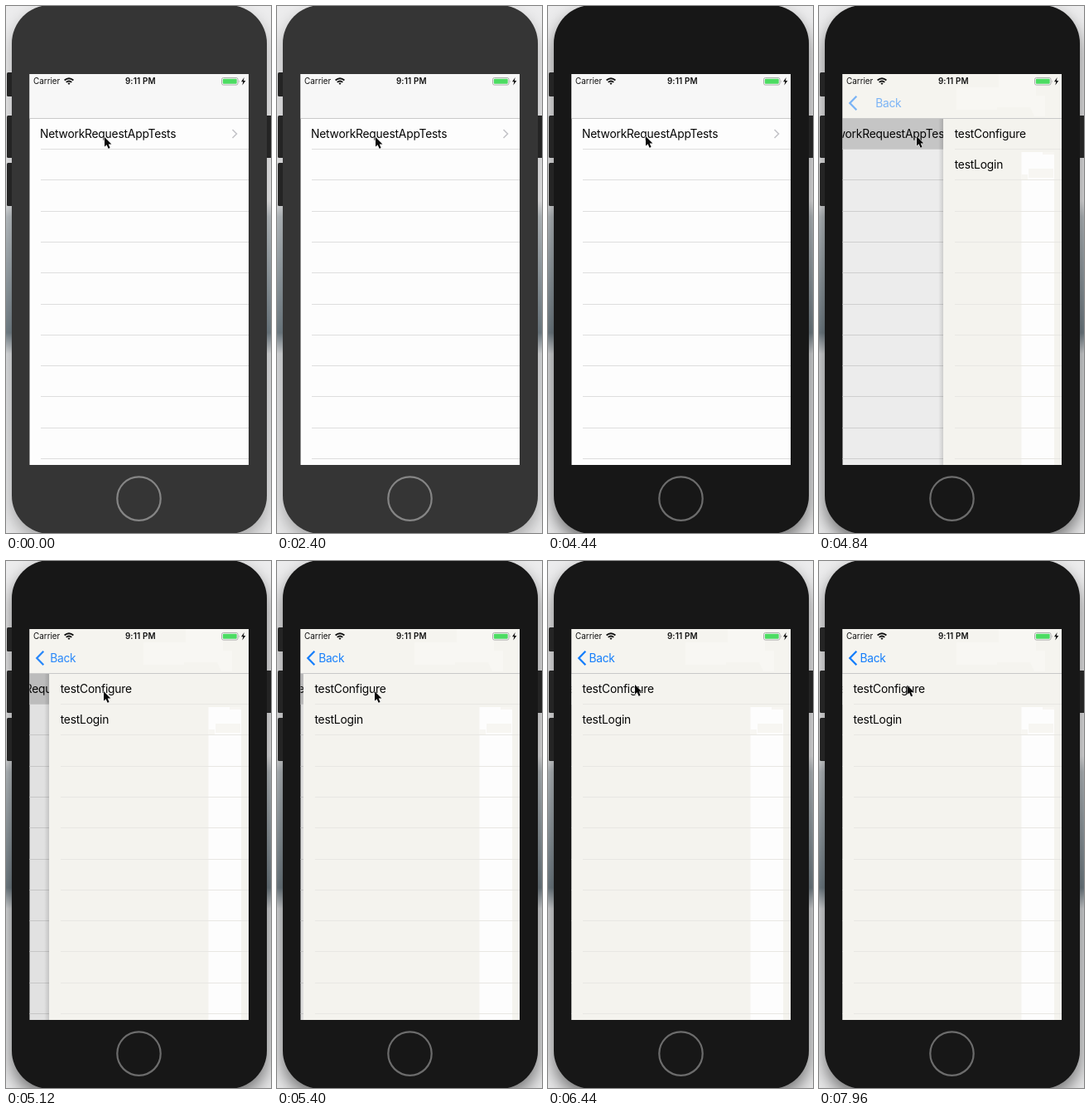
Write an HTML page that moves like this. It is 320 px wide and 635 px high and loops after 8 s.

```html
<!DOCTYPE html>
<html lang="en">
<head>
<meta charset="utf-8">
<title>Test list</title>
<style>
  html, body { margin: 0; width: 100%; height: 100%; overflow: hidden; background: #d4d4d5; }
  svg { display: block; width: 320px; height: 635px; }
  text { font-family: Inter, Roboto, "Liberation Sans", sans-serif; white-space: pre; }
  .row { font-size: 13.8px; letter-spacing: -0.2px; fill: #050505; }
  .status { font-size: 9.9px; fill: #111; }
  .line { stroke: #dedede; stroke-width: 1; }
  #detail .line { stroke: #e8e7e3; }
  #backText { font-size: 13.8px; letter-spacing: -0.3px; }
</style>
</head>
<body>
<svg viewBox="0 0 320 635">
  <defs>
    <linearGradient id="desk" x1="0" y1="0" x2="0" y2="1">
      <stop offset="0" stop-color="#ececed"/>
      <stop offset=".37" stop-color="#ececed"/>
      <stop offset=".4" stop-color="#bcc2c6"/>
      <stop offset=".52" stop-color="#96a0a6"/>
      <stop offset=".62" stop-color="#75828a"/>
      <stop offset=".66" stop-color="#dcdee0"/>
      <stop offset="1" stop-color="#e8e8e9"/>
    </linearGradient>
    <linearGradient id="shade">
      <stop offset="0" stop-color="#000" stop-opacity="0"/>
      <stop offset="1" stop-color="#000" stop-opacity=".13"/>
    </linearGradient>
    <filter id="blur" x="-20%" y="-20%" width="140%" height="140%">
      <feGaussianBlur stdDeviation="10"/>
    </filter>
    <clipPath id="screen"><rect x="28.5" y="82" width="264.5" height="471"/></clipPath>
    <clipPath id="page"><rect id="pageClip" x="28" y="136" width="265" height="417"/></clipPath>
  </defs>

  <rect width="320" height="635" fill="url(#desk)"/>
  <rect id="shadow" x="7" y="9" width="308" height="637" rx="46" filter="url(#blur)"/>
  <g fill="#242424">
    <rect x="1" y="80" width="8" height="29" rx="1.5"/>
    <rect x="1" y="132" width="8" height="51" rx="1.5"/>
    <rect x="1" y="189" width="8" height="52" rx="1.5"/>
    <rect x="313" y="132" width="9" height="51" rx="1.5"/>
  </g>
  <rect id="body" x="7" y="-1" width="308" height="637" rx="46"/>
  <circle id="home" cx="160.5" cy="593.6" r="26.2" fill="none" stroke-width="2.2"/>

  <g clip-path="url(#screen)">
    <rect x="28" y="82" width="265" height="471" fill="#fdfdfd"/>
    <g id="list">
      <rect id="press" x="28" y="136" width="265" height="36.5" fill="#d3d3d3"/>
      <g class="lines"></g>
      <text class="row" x="41" y="158.5">NetworkRequestAppTests</text>
      <path d="M273.5 149l5 5-5 5" fill="none" stroke="#c4c4c8" stroke-width="1.6"/>
    </g>
    <rect id="dim" x="28" y="136" width="265" height="417"/>
    <rect id="edge" y="136" width="6" height="417" fill="url(#shade)"/>

    <g clip-path="url(#page)">
      <rect x="28" y="136" width="265" height="417" fill="#f4f3ee"/>
      <rect x="244.5" y="176" width="39.5" height="377" fill="#fdfdfd"/>
      <path d="M244 203h8v6h-8zM270 176h14v3h-14zM253 196h30v11h-30z" fill="#f7f6f2"/>
      <g id="detail">
        <g class="lines"></g>
        <text class="row" x="41.6" y="158.5">testConfigure</text>
        <text class="row" x="41.6" y="195.7">testLogin</text>
      </g>
    </g>

    <rect id="nav" x="28" y="82" width="265" height="53"/>
    <path id="glow" d="M166 98h51v-16h45v26h11v25h-13l-5-11h-40v3h-49z" fill="#f8f7f3"/>
    <path d="M28 135.5h265" stroke="#c9c9c9"/>
    <g id="back" fill="#157efb">
      <path d="M45.3 108.8l-8 8.2 8 8.2" fill="none" stroke="#157efb" stroke-width="2.3"/>
      <text id="backText" x="49.6" y="122">Back</text>
    </g>

    <text class="status" x="33" y="94.4">Carrier</text>
    <g fill="none" stroke="#111" stroke-width="1.8">
      <path d="M70.6 89.5q5.4-4.6 10.8 0M72.7 91.9q3.3-2.8 6.6 0"/>
      <path d="M74.4 93.1q1.6-1.3 3.2 0l-1.6 1.8z" fill="#111" stroke="none"/>
    </g>
    <text class="status" x="162.3" y="94.4" text-anchor="middle" font-weight="600" letter-spacing=".15">9:11 PM</text>
    <rect x="260.5" y="86.5" width="19.5" height="8.6" rx="2" fill="#fafafa" stroke="#a5a5a5" stroke-width=".9"/>
    <rect x="261.8" y="87.8" width="16.9" height="6" rx="1" fill="#4cdc62"/>
    <path d="M281.3 89.2q1.3 1.6 0 3.2z" fill="#a5a5a5"/>
    <path d="M287.6 86l-3.6 5.2h2.3l-1 4.2 4-5.5h-2.5z" fill="#111"/>
  </g>

  <path id="cursor" d="M0 0v11.6l2.6-2.4 2 4.6 2-.8-1.9-4.5h3.7z" fill="#080808" stroke="#fff" stroke-width="1" paint-order="stroke"/>
</svg>
<script>
  const LOOP = 8000, DARK = 4440, PRESS = 4560, PUSH = 4611;
  const LEFT = 28, WIDTH = 265;
  const $ = id => document.getElementById(id);
  const set = (id, attrs) => {
    for (const key in attrs) $(id).setAttribute(key, attrs[key]);
  };
  const shift = x => `translate(${x.toFixed(2)} 0)`;

  const lines = Array.from({ length: 11 }, (_, i) => {
    const y = Math.round(172.2 + i * 37.27) + .5;
    return `<path class="line" d="M42 ${y}h251"/>`;
  }).join('');
  document.querySelectorAll('.lines').forEach(g => g.innerHTML = lines);

  // time, x, y of the pointer tip
  const pointer = [
    [0, 119, 158], [2400, 119, 158], [2680, 118, 157], [5800, 118, 157],
    [6080, 107, 150], [6400, 105, 149], [7800, 105, 149], [7960, 106.5, 149.5]
  ];

  function pointerAt(t) {
    const next = pointer.findIndex(p => p[0] > t);
    if (next < 0) return pointer.at(-1).slice(1);
    const a = pointer[next - 1], b = pointer[next];
    const k = (t - a[0]) / (b[0] - a[0]);
    return [1, 2].map(i => a[i] + (b[i] - a[i]) * k);
  }

  // critically damped spring
  function pushed(t) {
    const u = Math.max(0, t - PUSH) * .00786;
    return 1 - (1 + u) * Math.exp(-u);
  }

  function draw(t) {
    const p = pushed(t), rest = (1 - p) * WIDTH;
    const dark = t >= DARK, moving = t >= PUSH;
    set('shadow', { opacity: dark ? .5 : .28 });
    set('body', { fill: dark ? '#171717' : '#353535' });
    set('home', { stroke: dark ? '#6c6c6c' : '#858585' });
    set('press', { opacity: t >= PRESS ? 1 : 0 });
    set('list', { transform: shift(-.3 * WIDTH * p) });
    set('dim', { opacity: .12 * p });
    set('edge', { x: LEFT + rest - 6, opacity: moving ? Math.min(1, rest / 20) : 0 });
    set('pageClip', { x: LEFT + rest });
    set('detail', { transform: shift(rest) });
    set('nav', { fill: moving ? '#f5f4ef' : '#f7f7f7' });
    set('glow', { opacity: moving ? 1 : 0 });
    set('back', { opacity: p });
    set('backText', { transform: shift(41 * (1 - p) - .6 * (1 - p)) });
    set('cursor', { transform: `translate(${pointerAt(t).join(' ')})` });
  }

  function tick() {
    draw(performance.now() % LOOP);
    requestAnimationFrame(tick);
  }
  tick();
</script>
</body>
</html>
```
